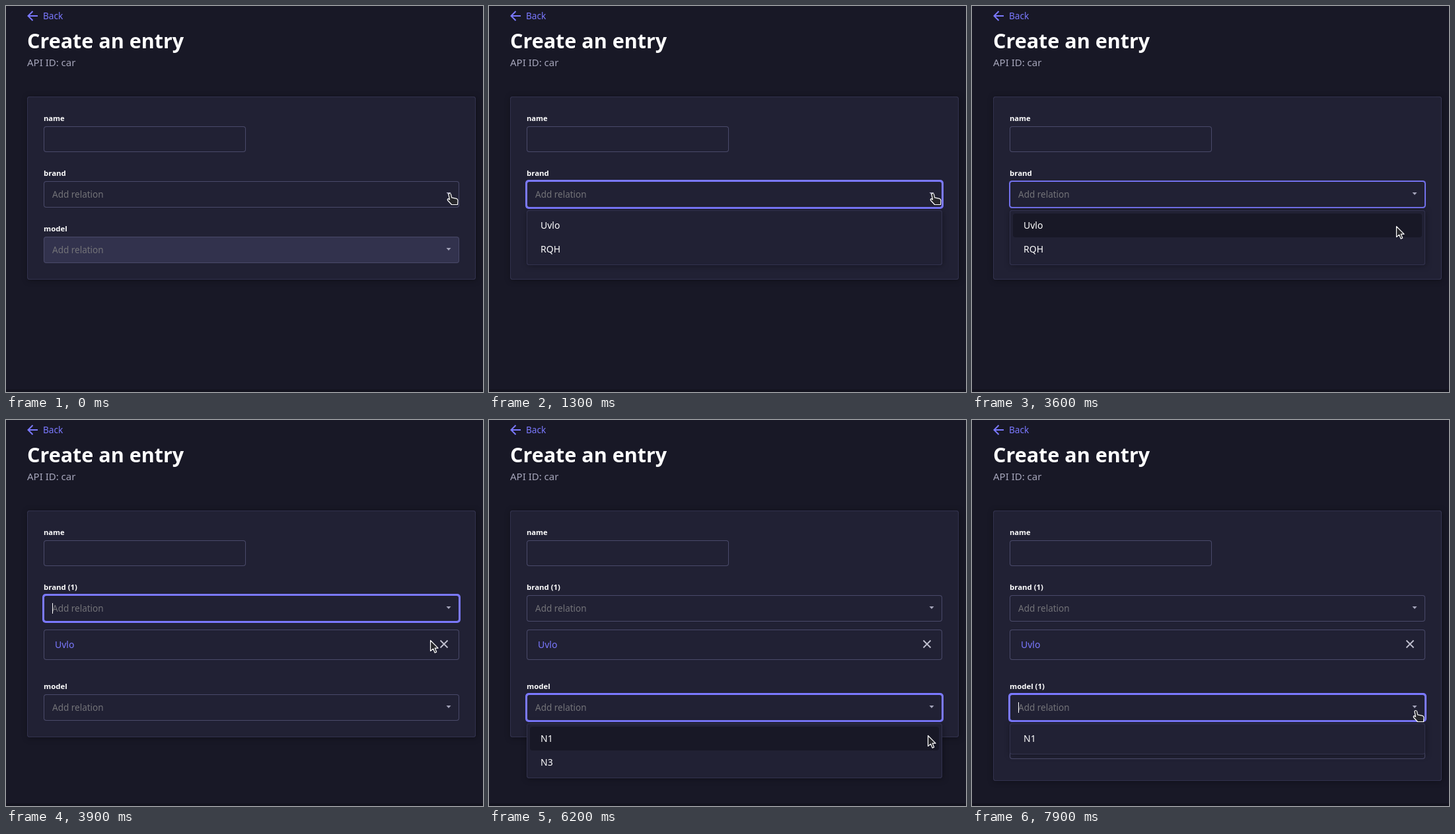
An HTML page with a canvas that plays this animation: 722 px wide and 584 px high, repeating every 8 s.

```html
<!DOCTYPE html>
<html lang="en">
<head>
<meta charset="utf-8">
<title>Create an entry</title>
<style>
  html, body { margin: 0; width: 100%; height: 100%; overflow: hidden; background: #181826; }
  canvas { display: block; }
</style>
</head>
<body>
<canvas id="stage" width="722" height="584"></canvas>
<script>
const ctx = document.getElementById('stage').getContext('2d');
const LOOP = 8000, STEP = 100;
const C = {
  page: '#181826', card: '#212134', line: '#32324d', edge: '#4a4a6a',
  muted: '#a5a5ba', hint: '#737378', accent: '#7b79ff', white: '#ffffff'
};
const FONT = '"Noto Sans", "Open Sans", sans-serif';
const LEFT = 57, WIDTH = 629;
const BRANDS = ['Uvlo', 'RQH'], MODELS = ['N1', 'N3'];

// Pointer tip: time, x, y
const PATH = [
  [0, 671, 283], [1600, 671, 283], [2300, 652, 365], [2400, 652, 365],
  [2700, 642, 333], [4200, 642, 333], [5100, 675, 432], [5600, 675, 432],
  [6000, 665, 476], [6100, 665, 476], [6200, 664, 477], [6500, 660, 513],
  [7000, 660, 513], [7400, 675, 455], [7600, 671, 439], [LOOP, 671, 439]
];
// Focus ring strength: time, amount
const BRAND_RING = [[700, 0], [900, 1], [3500, 1], [3600, .5], [3700, .3], [3900, 1], [5300, 1], [5500, 0]];
const MODEL_RING = [[5300, 0], [5500, 1], [6600, 1], [6700, .5], [6800, .3], [7000, 1]];

const ARROW = new Path2D('M0 0V16L4 12.6L6.6 18.6L9.2 17.5L6.7 11.6H11.6Z');
const HAND = new Path2D('M-1.6 2Q-1.6 0 .2 0Q2 0 2.2 2L3 6.3L10 7.8Q12.4 8.6 12.4 11L12 17H3L-3 10.5Q-4 8.5 -1.8 8.2L0 9.4Z');

// Interpolates every value after the time in each key.
function sample(keys, t) {
  if (t <= keys[0][0]) return keys[0].slice(1);
  for (let i = 1; i < keys.length; i++) {
    const a = keys[i - 1], b = keys[i];
    if (t <= b[0]) {
      const k = (t - a[0]) / (b[0] - a[0]);
      return a.slice(1).map((v, j) => v + (b[j + 1] - v) * k);
    }
  }
  return keys[keys.length - 1].slice(1);
}

const within = (t, from, to) => t >= from && t < to;
const blink = (t, from, to) => within(t, from, to) && (t - from) % 1200 < 600;

function text(str, x, y, size, color, weight = 400) {
  ctx.font = `${weight} ${size}px ${FONT}`;
  ctx.fillStyle = color;
  ctx.fillText(str, x, y);
}

function roundRect(x, y, w, h, r, fill) {
  ctx.beginPath();
  ctx.roundRect(x, y, w, h, r);
  ctx.fillStyle = fill;
  ctx.fill();
}

function box(x, y, w, h, fill, border) {
  roundRect(x, y, w, h, 4, border);
  roundRect(x + 1, y + 1, w - 2, h - 2, 3, fill);
}

function shadowBox(x, y, w, h) {
  ctx.save();
  ctx.shadowColor = 'rgba(3, 3, 5, .35)';
  ctx.shadowBlur = 10;
  ctx.shadowOffsetX = ctx.shadowOffsetY = 1;
  roundRect(x, y, w, h, 4, C.line);
  ctx.restore();
  box(x, y, w, h, C.card, C.line);
}

function strokeLines(d, color, width) {
  ctx.strokeStyle = color;
  ctx.lineWidth = width;
  ctx.stroke(new Path2D(d));
}

function relation(y, label, { ring = 0, caret = false, disabled = false, item = '' }) {
  text(label, LEFT, y - 8, 11.4, C.white, 700);
  if (ring > 0) {
    const s = 2 * ring;
    ctx.globalAlpha = .6 + .4 * ring;
    roundRect(LEFT - s, y - s, WIDTH + 2 * s, 40 + 2 * s, 4 + s / 2, C.accent);
    ctx.globalAlpha = 1;
  }
  box(LEFT, y, WIDTH, 40, disabled ? C.line : C.card, ring > .2 ? C.accent : C.edge);
  text('Add relation', 70, y + 25, 13.5, C.hint);
  ctx.fillStyle = C.muted;
  ctx.fill(new Path2D(`M666.5 ${y + 17}h7l-3.5 4z`));
  if (caret) {
    ctx.fillStyle = C.white;
    ctx.fillRect(70, y + 12, 1, 16);
  }
  if (item) {
    box(LEFT, y + 52, WIDTH, 46, C.card, C.edge);
    text(item, 74, y + 80, 14, C.accent);
    strokeLines(`M657.5 ${y + 68.5}l11 11m0 -11l-11 11`, '#c0c0cf', 1.8);
  }
}

function list(fieldY, names, py) {
  const top = fieldY + 44;
  shadowBox(LEFT, top, WIDTH, names.length * 36 + 11);
  names.forEach((name, i) => {
    const y = top + 5 + i * 36;
    if (py >= y && py < y + 36) roundRect(62, y, 619, 36, 4, C.page);
    text(name, 78, y + 23, 14, C.white);
  });
}

function pointer(x, y, hand) {
  ctx.save();
  ctx.translate(x + .5, y + .5);
  ctx.lineJoin = 'round';
  ctx.lineWidth = 1.2;
  ctx.fillStyle = '#26262a';
  ctx.strokeStyle = C.white;
  const shape = hand ? HAND : ARROW;
  ctx.fill(shape);
  ctx.stroke(shape);
  ctx.restore();
}

function draw(t) {
  const [px, py] = sample(PATH, t).map(Math.round);
  const hasBrand = t >= 3700, hasModel = t >= 6800;
  const modelY = hasBrand ? 415 : 349;

  ctx.fillStyle = C.page;
  ctx.fillRect(0, 0, 722, 584);
  ctx.fillStyle = '#13131f';
  ctx.fillRect(0, 580, 722, 4);

  strokeLines('M48 15H33.5M40.5 8L33.5 15L40.5 22', C.accent, 2);
  text('Back', 56, 20, 13.6, C.accent);
  text('Create an entry', 32, 64, 30.5, C.white, 700);
  text('API ID: car', 32, 91, 15, C.muted);

  shadowBox(32, 137, 679, hasModel ? 409 : hasBrand ? 343 : 277);
  text('name', LEFT, 174, 11.2, C.white, 700);
  box(LEFT, 182, 306, 39, C.card, C.edge);

  relation(265, hasBrand ? 'brand (1)' : 'brand', {
    ring: sample(BRAND_RING, t)[0],
    caret: blink(t, 700, 3600) || blink(t, 3700, 5300),
    item: hasBrand && BRANDS[0]
  });
  relation(modelY, hasModel ? 'model (1)' : 'model', {
    ring: sample(MODEL_RING, t)[0],
    caret: blink(t, 5300, 6700) || blink(t, 6800, 7900) || t >= 7900,
    disabled: !hasBrand,
    item: hasModel && MODELS[1]
  });

  if (within(t, 700, 3700)) list(265, BRANDS, py);
  if (within(t, 5300, 6800)) list(modelY, MODELS, py);
  if (t >= 7900) list(modelY, MODELS.slice(0, 1), py);

  pointer(px, py, t < 1800 || t >= 7500);
}

const start = performance.now();
function tick() {
  const t = (performance.now() - start) % LOOP;
  draw(Math.floor(t / STEP) * STEP);
  requestAnimationFrame(tick);
}
tick();
</script>
</body>
</html>
```
